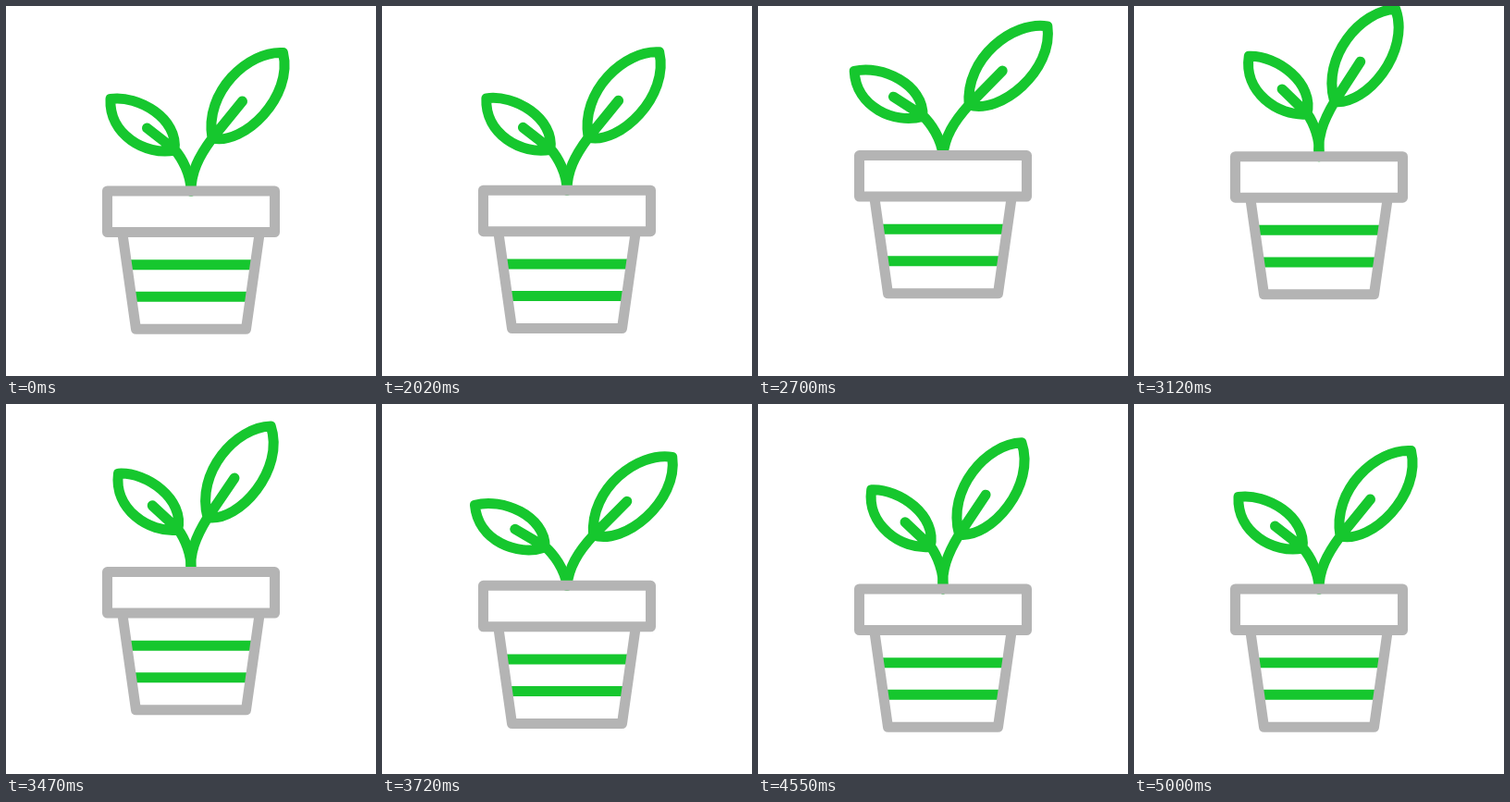
Animation, 400 px wide and 400 px high, one loop 5.02 s. Source, as an HTML page:

```html
<!DOCTYPE html>
<html>
<head>
<meta charset="utf-8">
<style>
  html, body { margin: 0; width: 100%; height: 100%; overflow: hidden; background: #fff; }
  svg { display: block; width: 100%; height: 100%; }
  path { fill: none; stroke: #b4b4b4; stroke-width: 11; stroke-linecap: round; stroke-linejoin: round; }
  .green { stroke: #16c72e; }
</style>
</head>
<body>
<svg viewBox="0 0 400 400">
  <g id="plant">
    <path id="left" class="green" d="M113 100.5C143 96 187 122 182 156C151 162 111 139 113 100.5ZM152.5 132L182 155C190 164 200 182 200 200"/>
    <path id="right" class="green" d="M299.5 50.5C262 48 214 93 223 143C257 151 311 98 299.5 50.5ZM255.5 103L223 143C208 163 200 180 200 200"/>
    <path class="green" d="M133 279.7H267M138 314.3H262"/>
    <path d="M109.5 200H290.5V244.5H109.5ZM125.7 244.5L140.5 349.2H259.5L274.3 244.5"/>
  </g>
</svg>
<script>
const LOOP = 5020;
const part = id => document.getElementById(id);
const easeOut = x => Math.sin(x * Math.PI / 2);
const easeInOut = x => (1 - Math.cos(x * Math.PI)) / 2;

// Keys are [time, value, easing towards this key].
function valueAt(keys, t) {
  let [t0, v0] = keys[0];
  if (t <= t0) return v0;
  for (const [t1, v1, ease = easeInOut] of keys) {
    if (t < t1) return v0 + (v1 - v0) * ease((t - t0) / (t1 - t0));
    [t0, v0] = [t1, v1];
  }
  return v0;
}

const lift = [[2012, 0], [2714, -38.5, easeOut], [3025, -38.5], [3895, 0]];

// Both leaves swing out from the stem; the left one drops further on landing.
const swing = landing => [
  [2005, 0], [2365, 15.2], [3070, -6.2], [3370, -6.2],
  [3980, landing], [4600, -5.7], [5000, 0]
];
const swingLeft = swing(16.3), swingRight = swing(13);

function draw(now) {
  const t = now % LOOP;
  part('plant').setAttribute('transform', `translate(0 ${valueAt(lift, t)})`);
  part('left').setAttribute('transform', `rotate(${-valueAt(swingLeft, t)} 200 200)`);
  part('right').setAttribute('transform', `rotate(${valueAt(swingRight, t)} 200 200)`);
}

const start = performance.now();
function tick() {
  draw(performance.now() - start);
  requestAnimationFrame(tick);
}
tick();
</script>
</body>
</html>
```
